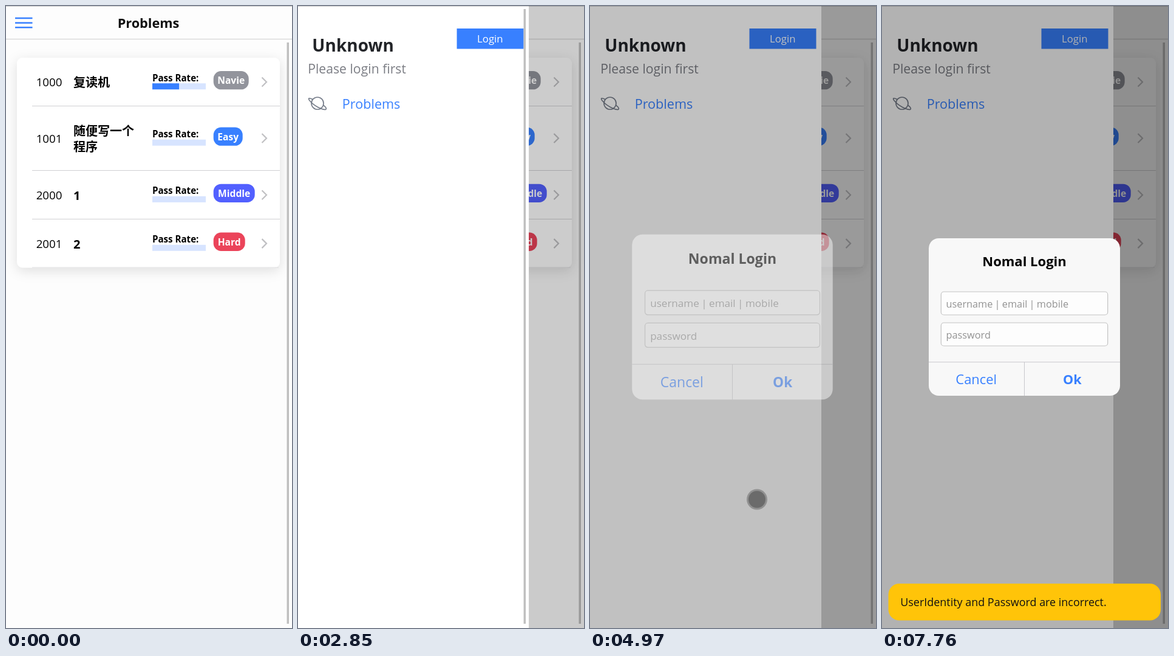
These frames come from a looping animation (471 by 1023 pixels, 8 s). An HTML page:

```html
<!DOCTYPE html>
<html lang="en">
<head>
<meta charset="utf-8">
<title>Problem list</title>
<style>
  html, body { margin: 0; width: 100%; height: 100%; overflow: hidden; background: #fdfdfd; }
  svg { display: block; width: 100%; height: 100%; }
  text { font-family: "Open Sans", "Noto Sans", "Noto Sans CJK SC", "Noto Sans CJK", sans-serif; white-space: pre; }
  .cjk { font-family: "Noto Sans CJK SC", "Noto Sans CJK", sans-serif; }
  .bold { font-weight: 700; }
  .mid { text-anchor: middle; }
  .hint { word-spacing: -1px; }
  .card { filter: drop-shadow(0 5px 10px rgba(0, 0, 0, .12)); }
</style>
</head>
<body>
<svg id="stage" viewBox="0 0 471 1023" preserveAspectRatio="none"></svg>
<script>
const LOOP = 8000;
const BLUE = '#3880ff';
const LINE = '#c8c7cc';

// ---- Markup helpers ----
const rect = (x, y, w, h, fill, r = 0, extra = '') =>
  `<rect x="${x}" y="${y}" width="${w}" height="${h}" rx="${r}" fill="${fill}" ${extra}/>`;
const text = (x, y, size, str, cls = '', fill = '#000') =>
  `<text x="${x}" y="${y}" font-size="${size}" class="${cls}" fill="${fill}">${str}</text>`;
const stroke = (d, color, width = 1) =>
  `<path d="${d}" fill="none" stroke="${color}" stroke-width="${width}"/>`;
const shade = id => rect(0, 0, 471, 1023, '#000', 0, `id="${id}"`);

// ---- Views ----
const problems = [
  { y: 107, id: '1000', title: ['复读机'], rate: .5, level: 'Navie', w: 58, color: '#92949c' },
  { y: 199.5, id: '1001', title: ['随便写一个', '程序'], rate: 0, level: 'Easy', w: 48, color: BLUE },
  { y: 292.7, id: '2000', title: ['1'], rate: 0, level: 'Middle', w: 68, color: '#5260ff' },
  { y: 372.6, id: '2001', title: ['2'], rate: 0, level: 'Hard', w: 52, color: '#eb445a' }
];

function problemRow({ y, id, title, rate, level, w, color }) {
  const latin = title[0].length === 1;
  const first = y + 26 - (title.length - 1) * 12.5;
  return text(71, y + 25, 18.7, id, 'mid') +
    title.map((line, i) =>
      text(111, first + i * 26, 20, line, latin ? 'bold' : 'bold cjk')).join('') +
    text(241, y + 16.6, 15.1, 'Pass Rate:', 'bold') +
    rect(241, y + 20.2, 88, 10, '#d7e4ff') +
    rect(241, y + 20.2, 88 * rate, 10, BLUE) +
    rect(341.7, y, w, 30.3, color, 12.5) +
    text(341.7 + w / 2, y + 21, 15.6, level, 'bold mid', '#fff') +
    stroke(`M421.5 ${y + 10.5}l7.5 7.5l-7.5 7.5`, '#c0c0c3', 2.2);
}

const spinnerDots = Array.from({ length: 8 }, (_, i) => {
  const a = i * Math.PI / 4;
  return `<circle class="dot" cx="${235 + 11.5 * Math.cos(a)}" cy="${78 + 11.5 * Math.sin(a)}" r="2.8"/>`;
}).join('');

const page = rect(0, 0, 471, 1023, '#fdfdfd') +
  `<g id="refresher">${spinnerDots}${text(234.5, 126.3, 20.3, 'Refreshing...', 'mid')}</g>
  <g id="list">${rect(18, 85, 433, 345.5, '#fff', 9, 'class="card"')}
    ${stroke('M43 164.5H451M43 270.5H451M43 350.5H451', '#d0d0d3')}
    ${stroke('M43 430H449', '#dedee0')}
    ${problems.map(problemRow).join('')}</g>` +
  rect(0, 0, 471, 54, '#fdfdfd') +
  stroke('M0 54.5H471', '#dadada', 1.4) +
  stroke('M15 20H43.5M15 27.7H43.5M15 35.3H43.5', BLUE, 2.4) +
  text(234.5, 36, 21.7, 'Problems', 'bold mid', '#111') +
  rect(462.5, 60, 3.5, 956, '#bfbfbf', 0, 'id="pageBar"');

const planet = `<g fill="none" stroke="#767d8a" stroke-width="1.7">
  <circle cx="33" cy="160" r="10"/>
  <path d="M25 153.5C19 150.5 17 151.5 20 155.5C24 160.5 31 165.5 38 168.5C46 171.8 50 170.5 45.5 165.5L42.5 162.8"/></g>`;

const drawer = `<g id="drawer">${rect(0, 0, 381, 1023, '#fff')}
  ${text(91.5, 75, 28, 'Unknown', 'bold mid', '#222428')}
  ${text(98, 111, 21.2, 'Please login first', 'mid', '#7b7d84')}
  ${rect(262.5, 37, 110, 33.5, BLUE)}
  ${text(317.3, 60, 16.8, 'Login', 'mid', '#fff')}
  ${planet}
  ${text(121.5, 169, 21.6, 'Problems', 'mid', BLUE)}
  ${rect(372.5, 5, 3.5, 1011, '#bfbfbf', 0, 'id="drawerBar"')}</g>`;

const sheet = `<g id="sheet">${rect(8, 0, 453, 141.5, '#f9f9f9', 17)}
  ${stroke('M8 70.5H461', '#e2e2e4')}
  ${text(234.5, 45, 26.3, 'Normal Login', 'mid', BLUE)}
  ${text(234.5, 116, 26.4, 'Mobile Login/Register', 'mid', BLUE)}
  ${rect(8, 151.5, 453, 70, '#fff', 17)}
  ${text(234.5, 196, 26, 'Cancel', 'bold mid', BLUE)}</g>`;

const field = (y, hint) =>
  rect(97.3, y, 274.4, 38, '#fdfdfd', 4.5, 'stroke="#c3c3c3" stroke-width="1.2"') +
  text(105.5, y + 26, 16.3, hint, 'hint', '#929292');

const dialog = `<g id="dialog">${rect(77, 382, 315, 259, '#f8f8f8', 16.5)}
  ${text(234.5, 428, 22, 'Nomal Login', 'bold mid')}
  ${field(470, 'username | email | mobile')}
  ${field(521, 'password')}
  ${stroke('M77 585.7H392M234.5 585.7V641', LINE)}
  ${text(155.2, 622, 21.9, 'Cancel', 'mid', BLUE)}
  ${text(313.3, 622, 21.6, 'Ok', 'bold mid', BLUE)}</g>`;

const toast = `<g id="toast">${rect(10.5, 0, 448.5, 60.5, '#ffc409', 18)}
  ${text(200, 37, 17.95, 'UserIdentity and Password are incorrect.', 'mid', '#111')}</g>`;

const pointer = `<g id="pointer"><circle r="17" fill-opacity=".25"/><circle r="14" fill-opacity=".26"/></g>`;

const stage = document.getElementById('stage');
stage.innerHTML = page + shade('drawerShade') + drawer + shade('sheetShade') + sheet +
  shade('dialogShade') + dialog + toast + rect(0, 0, 471, 1, '#000', 0, 'opacity=".2"') + pointer;

const el = Object.fromEntries([...stage.querySelectorAll('[id]')].map(n => [n.id, n]));
const dots = stage.querySelectorAll('.dot');

// ---- Timing helpers ----
const clamp = v => Math.min(1, Math.max(0, v));
const smooth = p => p * p * (3 - 2 * p);
const easeOut = p => 1 - (1 - p) ** 3;

function bezier(x1, y1, x2, y2) {
  const at = (a, b, s) => 3 * (1 - s) ** 2 * s * a + 3 * (1 - s) * s * s * b + s ** 3;
  return x => {
    if (x <= 0 || x >= 1) return clamp(x);
    let lo = 0, hi = 1;
    for (let i = 0; i < 24; i++) {
      const s = (lo + hi) / 2;
      if (at(x1, x2, s) < x) lo = s; else hi = s;
    }
    return at(y1, y2, lo);
  };
}
const drawerEase = bezier(0, 0, .2, 1);
const sheetEase = bezier(.36, .66, .04, 1);
const dialogEase = bezier(.42, 0, .58, 1);
const toastEase = bezier(.155, 1.105, .295, 1.12);
const progress = (t, start, length, ease = p => p) => ease(clamp((t - start) / length));

const show = (node, visible) => node.setAttribute('visibility', visible ? 'visible' : 'hidden');
const move = (node, x, y) => node.setAttribute('transform', `translate(${x} ${y})`);
const fade = (node, o) => node.setAttribute('opacity', o);

// Each stroke is a visible stretch of [time, x, y] stops.
const pointerStrokes = [
  [[450, 404, 981], [530, 404, 981]],
  [[3130, 277, 62], [3230, 290, 47], [3920, 290, 47], [4700, 275, 811.5], [5050, 275, 811.5],
    [5350, 261, 491], [5630, 261, 491]],
  [[5910, 261, 491], [6110, 288, 622], [6560, 288, 622], [7020, 331, 709], [7480, 331, 709],
    [7760, 221, 497]]
];

function drawPointer(t) {
  const stops = pointerStrokes.find(s => t >= s[0][0] && t < s[s.length - 1][0]);
  show(el.pointer, stops);
  if (!stops) return;
  const i = stops.findIndex(s => s[0] > t);
  const [t0, x0, y0] = stops[i - 1], [t1, x1, y1] = stops[i];
  const p = progress(t, t0, t1 - t0, smooth);
  move(el.pointer, x0 + (x1 - x0) * p, y0 + (y1 - y0) * p);
}

function drawRefresh(t) {
  const pull = 96 * progress(t, 1060, 310, smooth) - 20 * progress(t, 1370, 100, smooth) -
    76 * progress(t, 1670, 340, easeOut);
  move(el.list, 0, pull);
  show(el.refresher, t >= 1370 && t < 1770);
  fade(el.refresher, 1 - progress(t, 1690, 80));
  const head = 2 + (t - 1470) / 125;
  dots.forEach((dot, i) => {
    const lag = (((head - i) % 8) + 8) % 8;
    fade(dot, Math.max(.04, 1 - lag / 7.4));
  });
  show(el.pageBar, t < 1090 || t >= 2290);
}

function drawDialog(t) {
  const leaving = t >= 6120 && t < 6740;
  const enter = progress(t, t < 6740 ? 4870 : 6760, 200, dialogEase);
  const leave = leaving ? progress(t, 6120, 200, dialogEase) : 0;
  const alpha = enter * (1 - leave);
  const scale = 1.1 - .1 * enter - .1 * leave;
  show(el.dialog, alpha > 0);
  fade(el.dialog, alpha);
  fade(el.dialogShade, .3 * alpha);
  el.dialog.setAttribute('transform',
    `translate(234.5 511.5) scale(${scale}) translate(-234.5 -511.5)`);
}

function draw(t) {
  drawRefresh(t);

  const open = progress(t, 2560, 312, drawerEase);
  move(el.drawer, -381 * (1 - open), 0);
  fade(el.drawerShade, .2 * open);
  show(el.drawerBar, t < 3130);

  const raised = progress(t, 3523, 400, sheetEase) - progress(t, 4850, 450, sheetEase);
  move(el.sheet, 0, 792 + 1023 * (1 - raised));
  fade(el.sheetShade, .4 * raised);

  drawDialog(t);
  move(el.toast, 0, 1023 - 73 * progress(t, 6350, 400, toastEase));
  drawPointer(t);
}

const began = performance.now();
function tick() {
  draw((performance.now() - began) % LOOP);
  requestAnimationFrame(tick);
}
tick();
</script>
</body>
</html>
```
